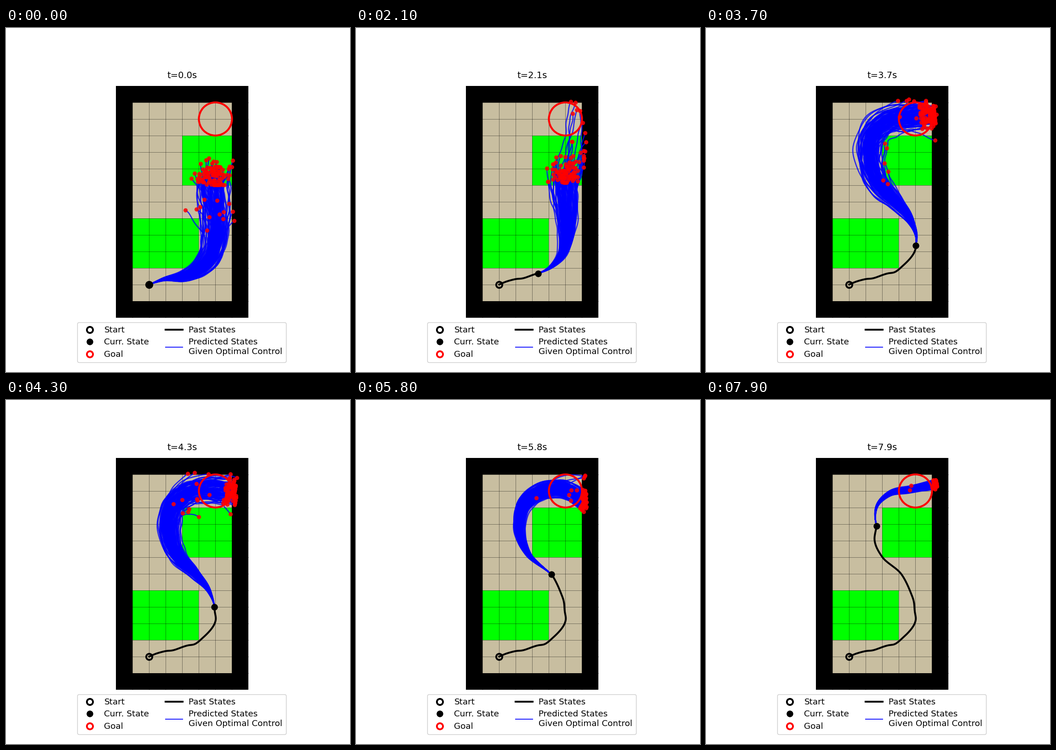
These frames come from a looping animation (748 by 748 pixels, 8000 ms). A matplotlib script:

```python
import numpy as np
import matplotlib.pyplot as plt
from matplotlib.animation import FuncAnimation
from matplotlib.collections import LineCollection
from matplotlib.patches import Circle, FancyBboxPatch, Rectangle

SIZE, DPI, FRAMES, STEP = 748, 100, 80, 0.1
CELL, LEFT, TOP = 36, 239.36, 125.76
START, GOAL = (311.4, 557.8), (455.4, 197.8)
PATHS, SPACING = 110, 5  # rollouts per frame, pixels between samples
PT = 72 / DPI  # points per pixel

plt.rcParams["font.family"] = "DejaVu Sans"


def spline(knots, values, q):
    """Cubic Hermite curve through values at knots."""
    slope = np.gradient(values, knots, axis=0)
    i = np.clip(np.searchsorted(knots, q, "right") - 1, 0, len(knots) - 2)
    h = (knots[i + 1] - knots[i])[..., None]
    f = (q - knots[i])[..., None] / h
    a, b = values[i], values[i + 1]
    return (a + (b - a) * f * f * (3 - 2 * f)
            + h * f * (1 - f) * (slope[i] * (1 - f) - slope[i + 1] * f))


def route(*points):
    """Evenly sampled smooth curve through a few points."""
    p = np.array([START, *points], float)
    dist = np.r_[0, np.cumsum(np.hypot(*np.diff(p, axis=0).T))]
    return spline(dist, p, np.arange(0, dist[-1], SPACING))


# Driven states: time, x, y
KEYS = np.array([
    (0, *START), (.48, 328, 551), (.9, 345.5, 546.3), (1.45, 364, 544),
    (2.1, 396, 533.5), (2.35, 410, 531), (2.7, 428, 517), (3.6, 456, 478),
    (4, 454, 460), (5, 448, 426), (5.8, 425, 379), (6.7, 383, 341),
    (7.4, 366.5, 304), (7.9, 371, 274)])

COMMON = [(345, 546), (385, 541), (422, 523), (447, 493), (456, 460)]
DIRECT = route(*COMMON, (457, 400), (452, 340), (464, 260), (490, 140))


def around(aim):
    """Route left of the upper obstacle, ending at height aim on the wall."""
    return route(*COMMON, (445, 420), (412, 378), (372, 335), (355, 280),
                 (366, 228), (397, 203), (440, 195), (512, aim))


def position(t):
    return spline(KEYS[:, 0], KEYS[:, 1:], np.array(t))


def ahead(curve, here, horizon):
    """Rest of a route, pulled over to start at the current state."""
    k = np.hypot(*(curve - here).T).argmin()
    rest = curve[k:k + int(horizon / SPACING)]
    d = np.arange(len(rest)) * SPACING
    line = rest + (here - rest[0]) * np.exp(-d / 50)[:, None]
    tangent = np.gradient(line, axis=0)
    tangent /= np.hypot(*tangent.T)[:, None]
    return line, np.c_[-tangent[:, 1], tangent[:, 0]], d


def wiggle(rng, d):
    return sum(np.sin(2 * np.pi * (d / w + rng.random())) * w / 200
               for w in rng.uniform((180, 60, 30), (400, 120, 60)))


def first(mask):
    return int(mask.argmax()) if mask.any() else len(mask)


def rollouts(t):
    rng = np.random.default_rng(400 + round(t / STEP))
    here = position(t)
    horizon = min(385 + 60 * t, 440)
    aim = np.interp(t, [3.7, 5, 6.7, 7.9], [186, 224, 236, 181])
    options = [ahead(c, here, horizon) for c in (DIRECT, around(aim))]
    left_share = np.interp(t, [0, .9, 2.1, 3.7], [0, 1, 0, 1])
    width = np.interp(t, [3.7, 6.7], [17, 7])

    paths = []
    for _ in range(PATHS):
        line, normal, d = options[int(rng.random() < left_share)]
        n = len(d)
        grow = 1 - np.exp(-(d / 150) ** 1.5)
        side = width * grow * (np.clip(rng.normal(), -2, 2) + .28 * wiggle(rng, d))
        stop = n * (1 - .18 * (1 - t / 8) * rng.random())
        if rng.random() < .2 * (1 - t / 9):  # stray that veers off
            turn = rng.uniform(.3, .8) * n
            veer = np.clip((np.arange(n) - turn) / (n - turn), 0, 1) ** 1.4
            side = side + rng.normal(0, 110 - 8 * t) * veer
            stop = turn + (n - turn) * rng.uniform(.3, 1)
        p = line + normal * side[:, None]
        x, y = p.T
        wall = ((x > 491 + 7 * rng.random()) | (x < 275 - 4 * rng.random())
                | (y < 162 - 4 * rng.random()))
        # the deeper inside the upper obstacle, the sooner a path ends
        inside = np.minimum.reduce([x - 383, 492 - x, y - 234, 342 - y]).clip(0)
        stuck = inside.cumsum() > 130 * rng.exponential()
        paths.append(p[:max(2, min(int(stop), first(wall) + 1, first(stuck) + 1))])
    return paths


fig = plt.figure(figsize=(SIZE / DPI, SIZE / DPI), dpi=DPI, facecolor="white")
ax = fig.add_axes([0, 0, 1, 1])
ax.set_xlim(0, SIZE)
ax.set_ylim(SIZE, 0)
ax.axis("off")


def cells(col, row, w, h, color):
    ax.add_patch(Rectangle((LEFT + col * CELL, TOP + row * CELL),
                           w * CELL, h * CELL, fc=color, lw=0))


def ring(x, y, color):
    ax.plot(x, y, "o", ms=13.2 * PT, mfc="none", mec=color, mew=3.9 * PT, zorder=6)


def dot(x, y):
    return ax.plot(x, y, "o", ms=14.4 * PT, color="black", mew=0, zorder=8)[0]


cells(0, 0, 8, 14, "black")
cells(1, 1, 6, 12, "#c8bea0")
cells(4, 3, 3, 3, "lime")
cells(1, 8, 4, 3, "lime")
grid = dict(color="black", lw=.5, alpha=.6, zorder=2)
for c in range(1, 8):
    ax.plot([LEFT + c * CELL] * 2, [TOP, TOP + 14 * CELL], **grid)
for r in range(1, 14):
    ax.plot([LEFT, LEFT + 8 * CELL], [TOP + r * CELL] * 2, **grid)
ax.add_patch(Circle(GOAL, CELL, fill=False, ec="red", lw=3, zorder=4))
ring(*START, "black")

# Legend
ax.add_patch(FancyBboxPatch((159.5, 644.5), 446, 79, fc="white", ec="#cccccc",
                            lw=1, boxstyle="round,pad=4,rounding_size=3.7"))
ring(181.7, 655.7, "black")
dot(181.7, 681.9)
ring(181.7, 708.7, "red")
ax.plot([347.5, 384.5], [655.7] * 2, color="black", lw=2.9)
ax.plot([347.5, 384.5], [693.8] * 2, color="blue", lw=1.4, alpha=.9)
for x, y, label in [(213.3, 661.6, "Start"), (213.3, 687.8, "Curr. State"),
                    (213.3, 714.6, "Goal"), (397.3, 661.6, "Past States"),
                    (397.3, 687.8, "Predicted States"),
                    (397.3, 708.6, "Given Optimal Control")]:
    ax.text(x, y, label, size=13.2, va="baseline")

title = ax.text(383.3, 109.3, "", size=14, ha="center", va="baseline")
fan = ax.add_collection(LineCollection([], colors="blue", linewidths=1.8,
                                       alpha=.8, zorder=3), autolim=False)
tips, = ax.plot([], [], "o", color="red", ms=9.2 * PT, mew=0, alpha=.85, zorder=5)
past, = ax.plot([], [], color="black", lw=2.9, zorder=7)
robot = dot([], [])


def update(i):
    t = i * STEP
    paths = rollouts(t)
    driven = position(np.linspace(0, t, 2 * i + 2))
    title.set_text(f"t={t:.1f}s")
    fan.set_segments(paths)
    tips.set_data(*np.array([p[-1] for p in paths]).T)
    past.set_data(*driven.T)
    robot.set_data(*driven[-1:].T)
    return title, fan, tips, past, robot


anim = FuncAnimation(fig, update, frames=FRAMES, interval=100, repeat=True)
plt.show()
```
